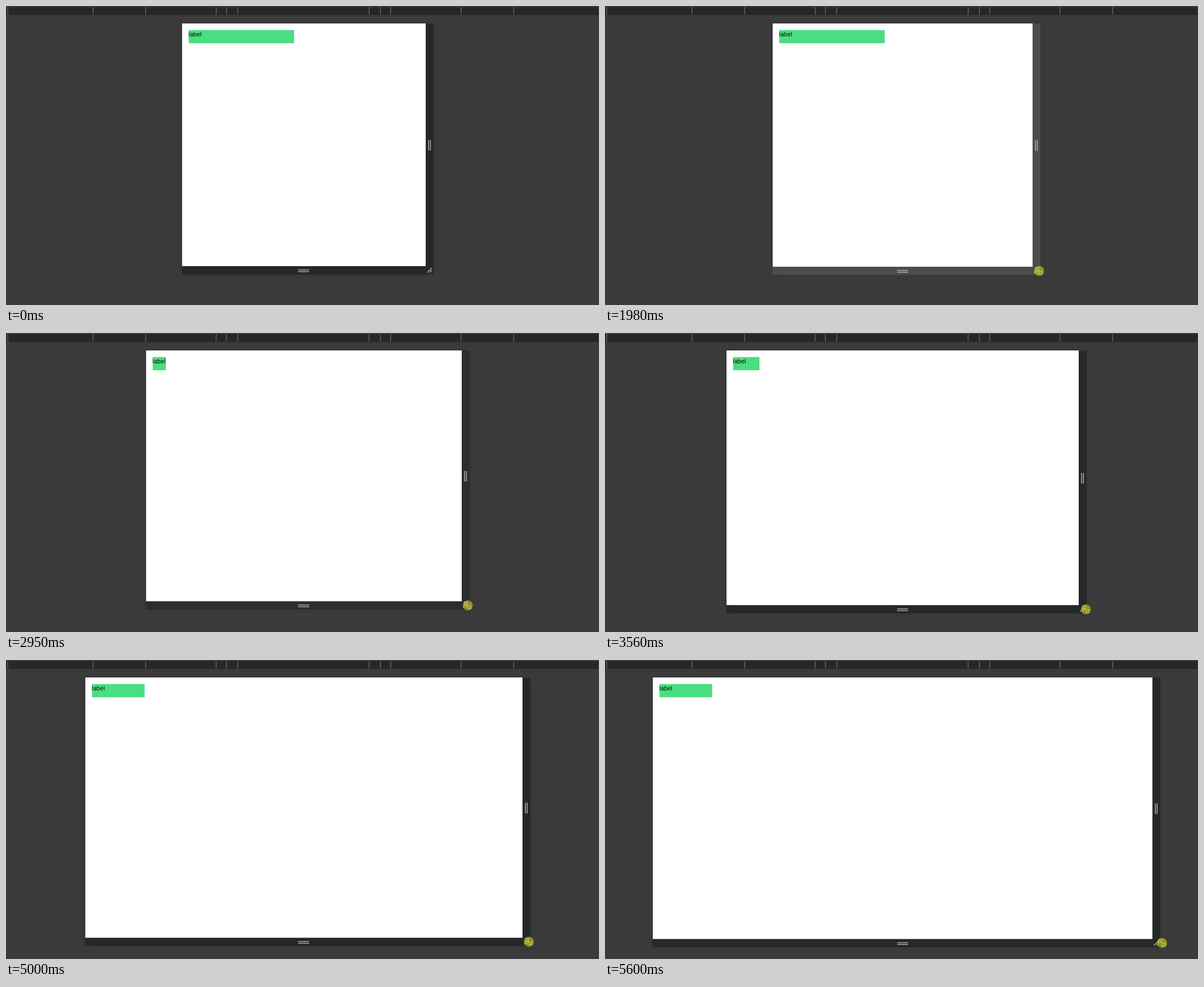
An HTML page with a canvas for the animation above (5.64 s loop, 1054 by 531 pixels).

```html
<!DOCTYPE html>
<html lang="en">
<head>
<meta charset="utf-8">
<title>Responsive viewport</title>
<style>
  html, body { margin: 0; width: 100%; height: 100%; overflow: hidden; background: #3b3b3b; }
  canvas { display: block; }
</style>
</head>
<body>
<canvas id="stage" width="1054" height="531"></canvas>
<script>
const ctx = document.getElementById('stage').getContext('2d');
const LOOP = 5640;
const STEP = 40;          // the screen refreshes in steps of this many ms
const LAG = 32;           // the page trails the pointer while resizing
const SCALE = 0.732;
const TOP = 31;
const CENTER = 529.25;
const BAR = 14;
const GRAB_X = 755;
const PRESS = 1370;

// Each drag carries the pointer on to x, with progress raised to the power bend
const DRAGS = [
  { start: 1620, end: 2220, x: 791, bend: 1.52 },
  { start: 2630, end: 3190, x: 833, bend: 0.62 },
  { start: 3440, end: 3920, x: 879, bend: 0.54 },
  { start: 4040, end: 4640, x: 913, bend: 1 },
  { start: 4640, end: 5240, x: 957, bend: 1.94 },
  { start: 5240, end: 5600, x: 990, bend: 2.85 }
];

const clamp = v => Math.min(1, Math.max(0, v));
const ramp = (t, a, b) => clamp((t - a) / (b - a));
const lerp = (a, b, u) => a + (b - a) * u;
const smooth = u => u * u * (3 - 2 * u);

// Snap a time to the refresh steps of the drag it falls in
function snap(t) {
  const from = DRAGS.reduce((s, d) => t >= d.start ? d.start : s, 0);
  return from + Math.floor((t - from) / STEP) * STEP;
}

function dragX(t) {
  return DRAGS.reduce((x, d) => lerp(x, d.x, ramp(t, d.start, d.end) ** d.bend), GRAB_X);
}

// Height of the page for a pointer x: the drag path flattens out
function pageBottom(x) {
  return lerp(462, 495.5, 1 - (1 - ramp(x, 766, 982)) ** 2);
}

function rect(x, y, w, h, fill) {
  ctx.fillStyle = fill;
  ctx.fillRect(x, y, w, h);
}

function line(x1, y1, x2, y2) {
  ctx.beginPath();
  ctx.moveTo(x1, y1);
  ctx.lineTo(x2, y2);
  ctx.stroke();
}

function barColor(glow) {
  const [r, g, b] = [37, 39, 41].map(v => Math.round(lerp(v, 76, glow)));
  return `rgb(${r},${g},${b})`;
}

function boxWidth(pageWidth) {
  const w = pageWidth / SCALE;
  return SCALE * (w < 640 ? 256 : w < 768 ? 32 : w < 1024 ? 64 : 128);
}

function drawRuler() {
  rect(0, 2, 1054, 14, '#252729');
  for (const size of [320, 375, 425, 768, 1024, 1440]) {
    for (const side of [-1, 1]) {
      rect(528 + side * size * 0.365, 2, 1.3, 13, '#6a6b6b');
    }
  }
}

function drawGrips(right, bottom) {
  const x = right + 6.8, y = bottom + 8.2;
  const edge = right + BAR, base = bottom + 14.5;
  const mid = (TOP + bottom) / 2 + 0.8;
  ctx.strokeStyle = '#b0b7ae';
  ctx.lineWidth = 1.4;
  for (const d of [-1.6, 1.6]) {
    line(x + d, mid - 9.5, x + d, mid + 9.5);
    line(519.3, y + d, 538.7, y + d);
  }
  for (const size of [8.5, 4.2]) {
    line(edge - 3 - size, base - 3, edge - 3, base - 3 - size);
  }
}

function drawContent(left, width) {
  const pad = 16 * SCALE;
  rect(left + pad, TOP + pad, boxWidth(width), 32 * SCALE, '#4ade80');
  ctx.fillStyle = '#111';
  ctx.font = '11px Roboto, Arial, sans-serif';
  ctx.fillText('label', left + pad - 0.5, 54);
}

function drawViewport(t) {
  const x = dragX(t - LAG);
  const right = Math.round(x - 9);
  const left = Math.round(2 * CENTER - (x - 9));
  const bottom = pageBottom(x);
  const edge = right + BAR, base = bottom + 14.5;
  const fade = 1 - ramp(t, 2650, 3010);
  const low = ramp(t, 740, 960) * fade;
  const side = ramp(t, 1640, 1800) * fade;

  ctx.save();
  ctx.shadowColor = 'rgba(12,12,13,.12)';
  ctx.shadowBlur = 10;
  rect(left, TOP + 0.5, edge - left, base - TOP - 0.5, barColor(side));
  ctx.restore();
  rect(left - 0.5, bottom, right - left + 0.5, 14.5, barColor(low));
  rect(left, TOP, right - left, bottom - TOP, '#fff');
  drawGrips(right, bottom);
  drawContent(left, right - left);
}

function icon(points, x, y, fill, stroke) {
  ctx.beginPath();
  points.forEach(([px, py]) => ctx.lineTo(x + px, y + py));
  ctx.closePath();
  ctx.fillStyle = fill;
  ctx.strokeStyle = stroke;
  ctx.lineWidth = 1;
  ctx.fill();
  ctx.stroke();
}

const ARROW = [[0.5, 0.5], [0.5, 13], [3.5, 10.5], [5.5, 15], [7.5, 14], [5.7, 9.8], [10, 9.5]];

// Half of the double arrow; the other half is its mirror through the centre
const HALF = [[-6, -6], [0, -5], [-2, -3], [3, 2], [5, 0]];
const RESIZE = HALF.concat(HALF.map(([x, y]) => [-x, -y]));

function drawPointer(t) {
  if (t < 160) return;
  if (t < 720) {
    const y = smooth(ramp(t, 160, 700) ** 0.85);
    icon(ARROW, lerp(643, 747, y ** 1.5), lerp(6, 440, y), '#111', '#fff');
    return;
  }
  if (t < PRESS) {
    const u = ramp(t, 720, 960);
    icon(RESIZE, lerp(754, GRAB_X, u), lerp(458, 468.5, u), '#111', '#fff');
    return;
  }
  const x = dragX(t), y = pageBottom(x) + 6.8;
  ctx.beginPath();
  ctx.arc(x, y, 8.9, 0, Math.PI * 2);
  ctx.fillStyle = 'rgba(200,198,8,.64)';
  ctx.fill();
  icon(RESIZE, x, y, '#83831c', '#d6d69c');
}

function draw(t) {
  rect(0, 0, 1054, 531, '#3b3b3b');
  drawRuler();
  drawViewport(snap(t));
  drawPointer(t < DRAGS[0].start ? t : snap(t));
}

const start = performance.now();
function frame() {
  draw((performance.now() - start) % LOOP);
  requestAnimationFrame(frame);
}
frame();
</script>
</body>
</html>
```
